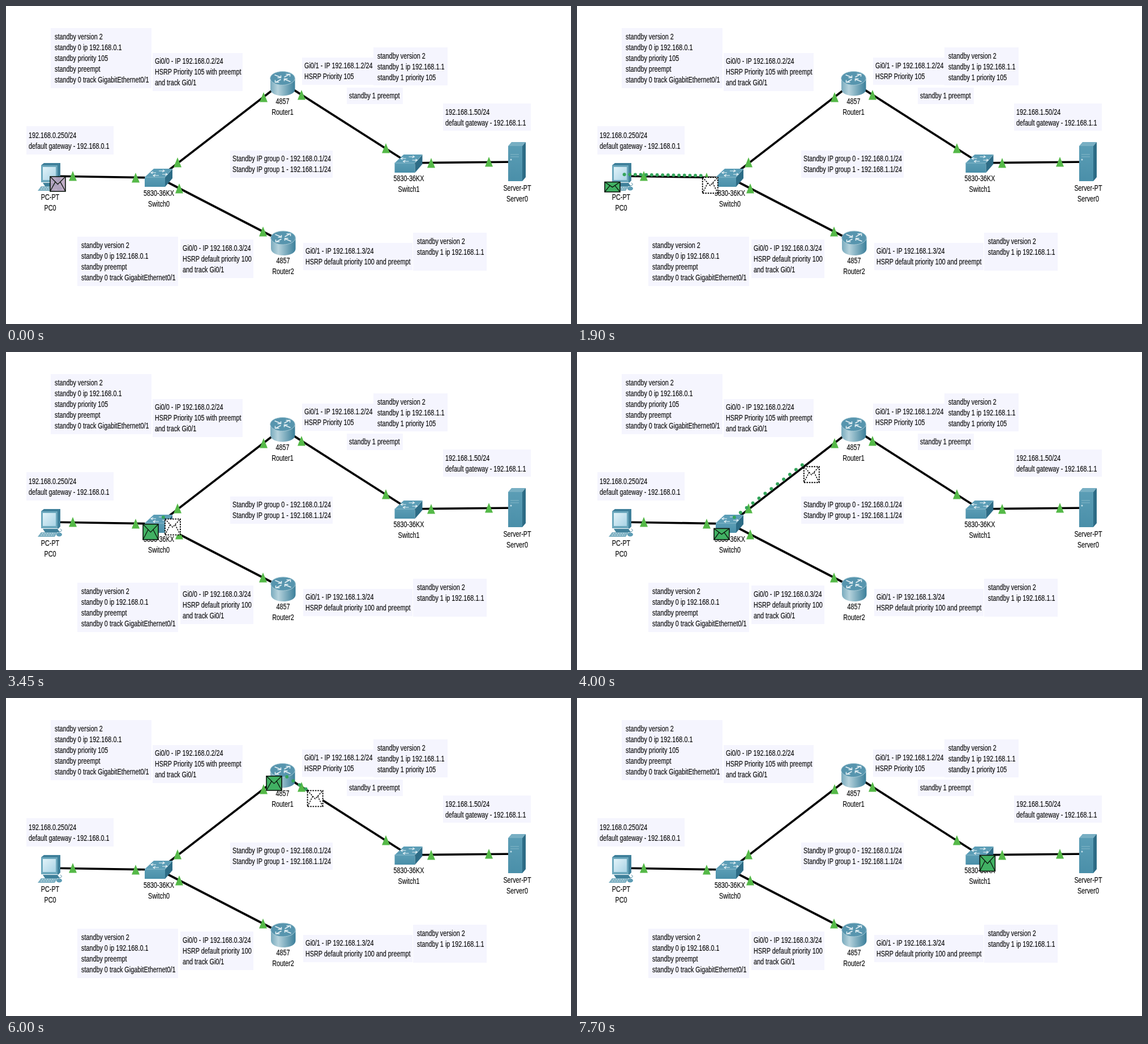
An HTML page for the animation above (8000 ms loop, 998 by 561 pixels).

```html
<!DOCTYPE html>
<html lang="en">
<head>
<meta charset="utf-8">
<title>Packet path</title>
<style>
  html, body { margin: 0; width: 100%; height: 100%; overflow: hidden; background: #fff; }
  svg { display: block; width: 998px; height: 561px; }
  text { font: 14px "Liberation Sans", Arial, sans-serif; fill: #111; stroke: #111; stroke-width: .2; }
  .mid { text-anchor: middle; }
  .note { fill: #f5f5fe; }
  .link { stroke: #000; stroke-width: 3.7; }
  .light { fill: #55b948; }
  .arrow { fill: none; stroke: #e6f1f5; stroke-width: 1.5; }
  .thin { stroke-width: 1.1; }
  .dot { fill: #35a55c; }
  .env { stroke: #0b150d; stroke-width: 1.6; }
  .env path { fill: none; stroke-width: 1.3; }
  .ghost { fill: #fff; stroke: #000; stroke-width: 1.9; stroke-dasharray: 2.6 1.8; }
  .ghost path { fill: none; stroke-width: 1.5; }
</style>
</head>
<body>
<svg viewBox="0 0 998 561">
  <defs>
    <linearGradient id="drum">
      <stop offset="0" stop-color="#78aabd"/>
      <stop offset=".3" stop-color="#b5d2dc"/>
      <stop offset="1" stop-color="#3b7f9a"/>
    </linearGradient>
    <linearGradient id="glass" x2="1" y2="1">
      <stop offset="0" stop-color="#e2f3f9"/>
      <stop offset="1" stop-color="#a9d3e5"/>
    </linearGradient>
    <linearGradient id="front" y2="1" x2="0">
      <stop offset="0" stop-color="#5b9db5"/>
      <stop offset="1" stop-color="#4a8fa9"/>
    </linearGradient>
    <g id="router">
      <path d="M-21.5-8V11C-21.5 27 22 27 22 11V-8Z" fill="url(#drum)"/>
      <ellipse cy="-8" rx="21.8" ry="12" fill="#5795ae" stroke="#a5c8d4"/>
      <path class="arrow" d="M-14-14-4-10M-9-9H-3V-13M14-2 4-6M9-7H3V-3M3-10 12-15M6-15H13V-11M-3-6-12-1M-6-1H-13V-5"/>
    </g>
    <g id="switch">
      <path d="M-25-1-9-16H24L11-1Z" fill="#5b9db6"/>
      <path d="M-25-1H11V16H-25Z" fill="url(#front)"/>
      <path d="M11-1 24-16V1L11 16Z" fill="#2d6c86"/>
      <path d="M-25-1H11L24-16" fill="none" stroke="#8dbccc"/>
      <path class="arrow thin" d="M0-12H9M7-14 10-12 6-10M6-6H14M12-8 15-6 11-4M-5-9H-13M-10-11-14-9-11-7M0-4H-9M-6-6-10-4-7-2"/>
    </g>
    <g id="pc">
      <path d="M-16-20-11-24H18V7L14 11Z" fill="#3f809a"/>
      <path d="M-16-20H13V10H-16Z" fill="#6ca8bd"/>
      <path d="M-13-17H10V6H-13Z" fill="url(#glass)"/>
      <path d="M-13 11H13L17 17H-9Z" fill="#3f809a"/>
      <path d="M-16 17H13L8 25H-22Z" fill="#78adc0"/>
      <path d="M-15 19H9M-17 22H7" stroke="#dcecf1" stroke-dasharray="3 1.5"/>
      <ellipse cx="16" cy="21" rx="5" ry="3.5" fill="#5c9cb4"/>
      <path d="M14 17C21 15 22 14 18 11" fill="none" stroke="#3f809a"/>
    </g>
    <g id="server">
      <path d="M-16-28-10-35H15L9-28Z" fill="#78afc3"/>
      <path d="M9-28 15-35V27L9 34Z" fill="#2d6c86"/>
      <path d="M-16-28H9V34H-16Z" fill="url(#front)"/>
      <path d="M-12-13H3M-12-9H3" stroke="#86b8c9"/>
      <circle cx="-11" cy="-4" r="1.5" fill="#c3dfe8"/>
    </g>
  </defs>
  <g id="scene"></g>
  <g id="packet"></g>
</svg>
<script>
const scene = document.getElementById('scene');
const packet = document.getElementById('packet');

// left, top, right, bottom, text x, middle of first line, lines
const notes = [
  [79, 39, 257, 145, 86, 54, 'standby version 2|standby 0 ip 192.168.0.1|standby priority 105|standby preempt|standby 0 track GigabitEthernet0/1'],
  [259, 83, 418, 150, 263, 97, 'Gi0/0 - IP 192.168.0.2/24|HSRP Priority 105 with preempt|and track Gi0/1'],
  [523, 91, 650, 139, 527, 105, 'Gi0/1 - IP 192.168.1.2/24|HSRP Priority 105'],
  [649, 73, 780, 140, 656, 88, 'standby version 2|standby 1 ip 192.168.1.1|standby 1 priority 105'],
  [602, 144, 701, 173, 606, 158, 'standby 1 preempt'],
  [772, 172, 927, 220, 776, 187, '192.168.1.50/24|default gateway - 192.168.1.1'],
  [36, 212, 190, 262, 40, 228, '192.168.0.250/24|default gateway - 192.168.0.1'],
  [396, 255, 577, 303, 400, 269, 'Standby IP group 0 - 192.168.0.1/24|Standby IP group 1 - 192.168.1.1/24'],
  [126, 407, 304, 494, 133, 422, 'standby version 2|standby 0 ip 192.168.0.1|standby preempt|standby 0 track GigabitEthernet0/1'],
  [308, 412, 437, 480, 312, 427, 'Gi0/0 - IP 192.168.0.3/24|HSRP default priority 100|and track Gi0/1'],
  [525, 418, 718, 466, 529, 432, 'Gi0/1 - IP 192.168.1.3/24|HSRP default priority 100 and preempt'],
  [719, 400, 849, 467, 726, 415, 'standby version 2|standby 1 ip 192.168.1.1']
];

const pc = [77, 300], sw0 = [270, 303], sw1 = [711, 277];
const r1 = [488, 135], r2 = [489, 416], server = [903, 275];
const links = [[pc, sw0], [sw0, r1], [sw0, r2], [r1, sw1], [sw1, server]];
const lights = ['118 300', '229 303', '303 276', '306 322', '455 161', '522 157', '454 398', '671 251', '751 277', '853 275'];

// icon, centre, middle of first label line, labels
const devices = [
  ['pc', 78, 301, 337, 'PC-PT|PC0'],
  ['switch', 270, 303, 330, '5830-36KX|Switch0'],
  ['router', 488.5, 135.5, 168, '4857|Router1'],
  ['router', 489.5, 417, 449, '4857|Router2'],
  ['switch', 711.5, 278, 304, '5830-36KX|Switch1'],
  ['server', 903, 275, 321, 'Server-PT|Server0']
];

// The lettering is narrow throughout: one condensed face for every line.
const lines = (x, y, str, cls = '') => str.split('|').map((s, i) =>
  `<text class="${cls}" transform="translate(${x} ${y + 5 + i * 19}) scale(.773 1)">${s}</text>`).join('');

scene.innerHTML =
  notes.map(([l, t, r, b, x, y, str]) =>
    `<rect class="note" x="${l}" y="${t}" width="${r - l}" height="${b - t}"/>` + lines(x, y, str)).join('') +
  links.map(([a, b]) => `<path class="link" d="M${a}L${b}"/>`).join('') +
  devices.map(([icon, x, y, ly, str]) =>
    `<use href="#${icon}" x="${x}" y="${y}"/>` + lines(x, ly, str, 'mid')).join('') +
  lights.map(p => `<path class="light" transform="translate(${p})" d="M0-9 7 8.5H-7Z"/>`).join('');

const STEP = 50, LOOP = 8000, W = 27, H = 28, DOTS = 20, TURN = 18;
const GREEN = '#41b163';

const hops = [
  { at: 1200, end: 2700, from: pc, to: sw0 },
  { at: 3450, end: 5300, from: sw0, to: r1 },
  { at: 5850, end: 7700, from: r1, to: sw1 }
];

const flap = h => `<path d="M0 0L${W / 2} ${h * .52}L${W} 0M0 ${h}L9 ${h * .36}M${W} ${h}L18 ${h * .36}"/>`;
const envelope = (x, y, h, attrs) =>
  `<g transform="translate(${x} ${y})" ${attrs}><rect width="${W}" height="${h}"/>${flap(h)}</g>`;
const solid = (x, y, h) => envelope(x, y, h, `class="env" fill="${GREEN}"`);
const arrived = ([x, y], h = H) => solid(x + .5, y + .5, h);

function trail(at, first, last) {
  let out = '';
  for (let j = first; j <= last; j++) {
    const [x, y] = at(j);
    out += `<circle class="dot" cx="${x - 3}" cy="${y - 3}" r="3"/>`;
  }
  return out;
}

function drawHop({ at, end, from, to }, ms) {
  const n = Math.floor((ms - at) / STEP);
  const point = j => from.map((v, i) => v + (to[i] - v) * j / DOTS);
  if (n < TURN) {
    // The last stretch is covered in double steps.
    const j = Math.min(DOTS, n + 1 + (n > 14) + (n > 15));
    const h = H * (1 - j / 40);
    const [x, y] = point(j);
    return trail(point, 1, j) +
      envelope(x, y, H, 'class="ghost"') +
      solid(from[0] - 28, from[1] + 28 - h, h);
  }
  const total = (end - at) / STEP - TURN;
  const gone = Math.min(DOTS, Math.floor((n - TURN) * DOTS / total));
  return trail(point, gone + 1, DOTS) + arrived(to, H * (.5 + gone / 40));
}

function draw(ms) {
  if (ms < 500)
    return envelope(78, 301, 26, 'class="env" fill="#b9a3bf" fill-opacity=".88"');
  const hop = hops.filter(h => ms >= h.at).pop();
  return hop ? drawHop(hop, ms) : arrived(pc);
}

let shown = -1;
function tick() {
  const slot = Math.floor(performance.now() % LOOP / STEP);
  if (slot !== shown) {
    shown = slot;
    packet.innerHTML = draw(slot * STEP);
  }
  requestAnimationFrame(tick);
}
tick();
</script>
</body>
</html>
```
